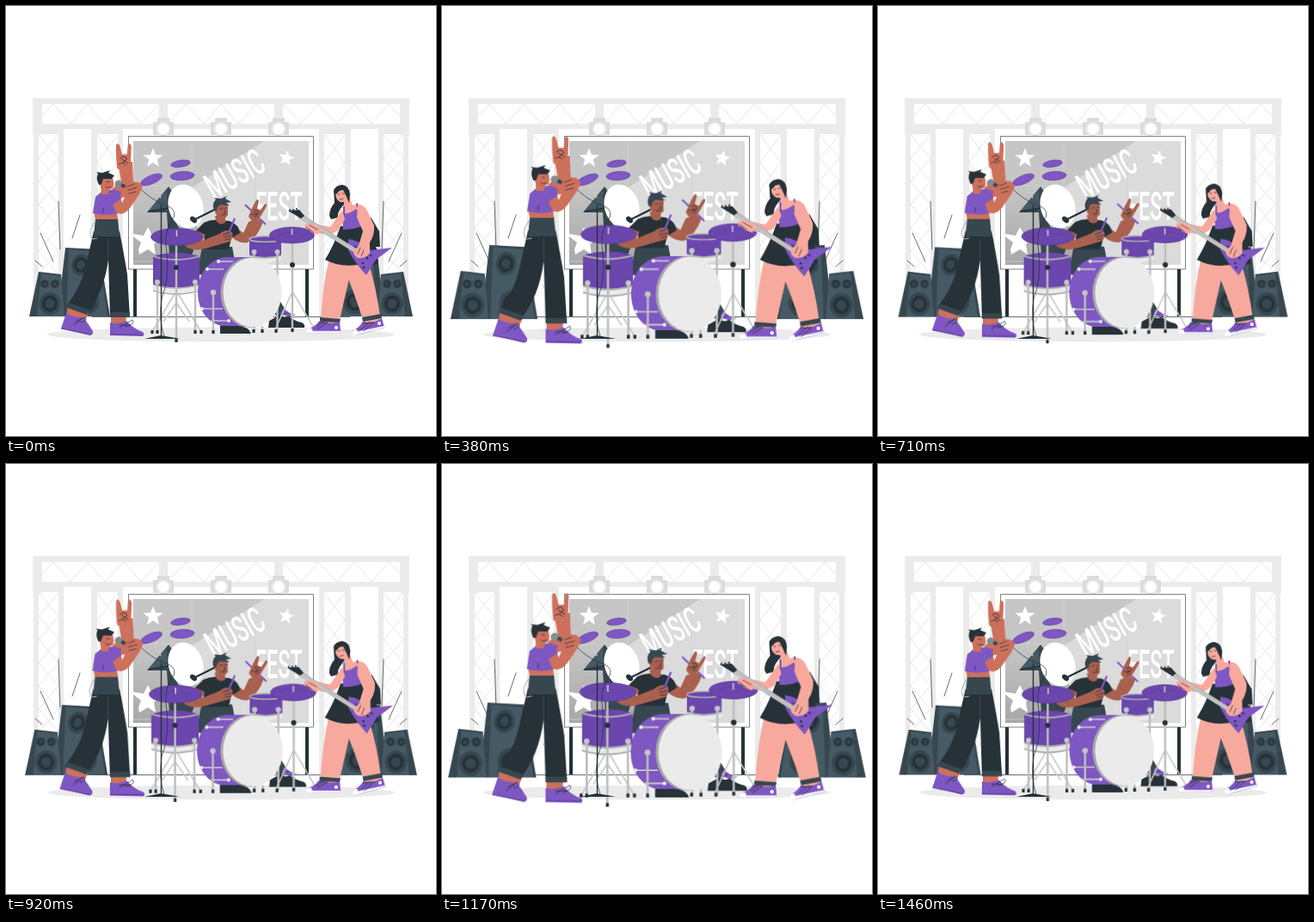
Animation, 500 px wide and 500 px high, one loop 1.5 s. Source, as an HTML page without scripts:

```html
<!DOCTYPE html>
<html lang="en">
<head>
<meta charset="utf-8">
<title>Music fest</title>
<style>
html, body { margin: 0; width: 100%; height: 100%; overflow: hidden; background: #fff; }
svg { display: block; width: 100%; height: 100%; }
.p { fill: #7e57c2; }
.pd { fill: #6a46ad; }
.d { fill: #263238; }
.s { fill: #37474f; }
.m { fill: #455a64; }
.g { fill: #c4c4c4; }
.l { fill: #ebebeb; }
.w { fill: #fff; }
.skin1 { fill: #cd705c; }
.skin2 { fill: #a9604f; }
.skin3 { fill: #f7a99d; }
.line { fill: none; stroke: #263238; stroke-width: .7; stroke-linecap: round; stroke-linejoin: round; }
.truss { fill: none; stroke: #e6e6e6; stroke-width: 1; }
.pole { fill: none; stroke: #bdbdbd; stroke-width: 2.4; }
.thin { fill: none; stroke: #c8c8c8; stroke-width: 1.6; }
.rim { fill: none; stroke: #b0b0b0; stroke-width: 1.8; }
.foot { fill: none; stroke: #263238; stroke-width: 3.2; }
text { font-family: Roboto, "Open Sans", sans-serif; font-weight: 500; fill: #fff; text-anchor: middle; }
/* 24 fps pulse: quick swell, slow release, twice per loop */
.pulse { animation: pulse 1.5s -4ms infinite; }
#speakers { transform-origin: 250px 321px; }
#drums { transform-origin: 263px 306px; }
#singer { transform-origin: 128px 271.5px; }
#guitarist { transform-origin: 388px 295px; }
@keyframes pulse {
  0% { transform: scale(1); animation-timing-function: steps(6); }
  16.6667% { transform: scale(1.1); animation-timing-function: steps(13); }
  52.7778% { transform: scale(1); animation-timing-function: steps(1); }
  55.5556% { transform: scale(1); animation-timing-function: steps(2); }
  61.1111% { transform: scale(1.022); animation-timing-function: steps(4); }
  72.2222% { transform: scale(1.09); animation-timing-function: steps(1); }
  75% { transform: scale(1.1); animation-timing-function: steps(9); }
  100% { transform: scale(1); }
}
</style>
</head>
<body>
<svg viewBox="0 0 500 500" xmlns="http://www.w3.org/2000/svg">
<defs>
  <linearGradient id="shade" x2="0" y2="1">
    <stop offset=".35" stop-color="#c6c6c6"/><stop offset="1" stop-color="#a8a8a8"/>
  </linearGradient>
  <path id="star" d="M0-12 3-4 11.5-3.7 4.8 1.6 7 9.7 0 5-7 9.7-4.8 1.6-11.5-3.7-3-4Z"/>
  <g id="lamp">
    <path fill="#dbdbdb" d="M-7-13H7V-8H12V7H-12V-8H-7Z"/>
    <circle r="8.5" fill="#e8e8e8"/><circle class="w" r="6.5"/>
  </g>
  <g id="tower">
    <path class="truss" d="M38 150 61 177 38 204 61 231 38 258 61 285 38 312 61 339 38 361M61 150 38 177 61 204 38 231 61 258 38 285 61 312 38 339M106 150 130 182 106 214 130 246 106 278 130 310 106 342M130 150 106 182 130 214 106 246 130 278 106 310 130 342"/>
    <path class="truss" d="M42 128 55 114 75 137 95 114 115 137 137 114 157 137 178 114"/>
    <path class="l" d="M31 107H42V150H38V361H32V150H31ZM61 143H67V361H61ZM99 143H106V361H99ZM130 143H136V361H130ZM38 143H61V149H38ZM106 143H130V149H106ZM178 114H188V137H178Z"/>
  </g>
  <g id="sparks" class="line">
    <path d="M61 227 63 283M86 243 77 270M40 264 55 297M34 296 42 303"/>
  </g>
  <g id="cone">
    <circle class="s" r="12.5"/><circle class="d" r="9"/><circle class="s" r="5.5"/>
  </g>
  <g id="stack">
    <path class="s" d="M69 281 108 283 121 361H60Z"/>
    <path class="m" d="M73 283 107 286 118 361H70Z"/>
    <use href="#cone" transform="translate(87 301) rotate(15) scale(.88 1)"/>
    <use href="#cone" transform="translate(94 344) scale(1.15)"/>
    <path class="s" d="M38 309 64 312 69 361H27Z"/>
    <path class="m" d="M41 311 64 314 68 361H36Z"/>
    <use href="#cone" transform="translate(51 346) scale(1 1.05)"/>
    <use href="#cone" transform="translate(45 323) scale(.42)"/>
    <use href="#cone" transform="translate(57 323) scale(.42)"/>
  </g>
  <g id="horns">
    <path d="M-6 10-7-3Q-7-8-7-13-5-17-3-12L-1-4 4-4 5-13Q7-17 8.5-12L8 2 6 11Q0 15-6 10Z"/>
    <path class="line" d="M-3 0Q2-4 4 1L0 4M-1 1 5 5M-4 6Q0 3 3 7"/>
  </g>
</defs>

<rect class="w" width="500" height="500"/>

<!-- Stage truss -->
<path class="truss" d="M188 137 209 114 230 137 250 114 270 137 291 114 312 137"/>
<use href="#tower"/>
<use href="#tower" transform="matrix(-1 0 0 1 500 0)"/>
<path class="l" d="M31 107H469V114H31ZM31 137H469V143H31Z"/>
<use href="#lamp" x="183" y="143"/><use href="#lamp" x="250" y="143"/><use href="#lamp" x="317" y="143"/>
<path class="line" d="M100 361.5H400"/>

<!-- Banner -->
<path class="d" d="M148 305H152V361H148ZM348 305H352V361H348Z"/>
<rect x="142.5" y="151.700" width="214.800" height="154.300" fill="#fff" stroke="#263238" stroke-width=".6"/>
<path fill="#dbdbdb" d="M148 157H352V301H148Z"/>
<path fill="url(#shade)" d="M148 157H300L212 214 225 268 260 301H148Z"/>
<path stroke="#d4d4d4" stroke-width=".7" d="M148 209H212M216 157V212M290 157V301M148 297H352"/>
<use href="#star" class="w" x="171" y="177"/>
<use href="#star" class="w" transform="translate(326 177) rotate(12) scale(.8)"/>
<path class="w" d="M154 283 157 275 148 268V265L160 267 165 257 170 267 181 269 172 277 174 289 165 283 155 289Z"/>
<text transform="translate(273 208) rotate(-29) scale(.56 1)" font-size="42">MUSIC</text>
<text transform="translate(317.500 249) scale(.5 1)" font-size="47">FEST</text>
<path class="s" d="M164 240 189 210 198 222Q190 248 206 264L222 272 216 290H190L187 240Z"/>
<path class="m" d="M187 214 166 238 187 236Z"/>
<ellipse class="w" cx="209" cy="233" rx="20" ry="26" transform="rotate(-18 209 233)"/>

<use href="#sparks"/>
<use href="#sparks" transform="matrix(-1 0 0 1 500 0)"/>
<ellipse class="l" cx="250" cy="382" rx="202" ry="8.500"/>

<g id="speakers" class="pulse">
  <use href="#stack"/>
  <use href="#stack" transform="matrix(-1 0 0 1 500 0)"/>
</g>

<path class="thin" d="M203 183 207 208M168 202 180 223"/>
<g class="p" stroke="#5c3d9c" stroke-width=".5">
  <ellipse cx="169" cy="202" rx="13.500" ry="5" transform="rotate(-23 169 202)"/>
  <ellipse cx="203" cy="183.300" rx="11.500" ry="4" transform="rotate(-8 203 183.300)"/>
  <ellipse cx="205" cy="197.500" rx="14" ry="5.200" transform="rotate(-4 205 197.500)"/>
</g>
<path class="line" style="stroke-width:2.2" d="M218 249 242 237"/>
<ellipse class="d" cx="218" cy="248.500" rx="4.500" ry="3" transform="rotate(40 218 248.500)"/>

<g id="drums" class="pulse">
  <!-- Drummer -->
  <path class="s" d="M228 280H263L270 318 222 312Z"/>
  <path class="s" d="M305 330 318 342 327 357 315 361 300 345Z"/>
  <path class="p" d="M322 352 332 358 329 362 319 357Z"/>
  <path class="d" d="M306 366Q314 362 318 359 322 364 329 361 337 367 344 368 348 370 347 374H305Z"/>
  <path class="line" d="M320 361 327 356M323 363 336 359"/>
  <path class="skin2" d="M266 256 276 264 282 251 292 247 299 251Q293 268 281 275 270 277 261 267Z"/>
  <path stroke="#7e57c2" stroke-width="2" d="M278 231 302 254"/>
  <use href="#horns" class="skin2" transform="translate(291 239) rotate(28) scale(.9)"/>
  <path class="d" d="M230 252Q238 248 246 249L260 250Q271 254 272 264L262 270 259 283H229L231 266 220 262Z"/>
  <path class="skin2" d="M243 244 255 244 255 252Q248 256 244 249Z"/>
  <path class="skin2" d="M242 230Q252 227 258 232L258 243Q254 249 248 247 242 243 242 230Z"/>
  <path class="s" d="M242 238Q239 230 244 225L242 223 250 224 257 221 255 224 262 228 256 229 260 232 249 231 246 234 245 238Z"/>
  <path class="line" d="M249 236 252 235M255 235 257 235M250 243Q253 244 256 242M254 237 255 240 253 241"/>
  <path class="skin2" d="M221 261 232 266 228 273 248 265Q257 258 263 263 265 269 260 274L232 282Q217 286 208 279 211 268 221 261Z"/>
  <path stroke="#7e57c2" stroke-width="2.200" d="M266 247 258 266"/>
  <path class="line" d="M253 266 260 263M254 269 262 267M255 272 261 271"/>

  <!-- Stands behind the drums -->
  <path class="thin" d="M198 331 170 379M198 331 227 379M333 332 313 376M333 332 359 376M198 345 183 367M198 345 213 367"/>

  <!-- Floor tom -->
  <path class="l" d="M171 318H225V331Q198 339 171 331Z"/>
  <path class="pd" d="M171 291Q198 283 225 291V324Q198 332 171 324Z"/>
  <path class="rim" d="M171 291Q198 299 225 291M171 324Q198 332 225 324M171 331Q198 339 225 331"/>
  <!-- Small tom -->
  <path class="l" d="M283 283H320V295Q301 302 283 295Z"/>
  <path class="pd" d="M283 271H320V290Q301 296 283 290Z"/>
  <ellipse class="pd" cx="301.500" cy="271" rx="18.500" ry="3.200" stroke="#b0b0b0" stroke-width="1.500"/>
  <path class="rim" d="M283 290Q301 296 320 290"/>
  <path class="pole" d="M288.500 286V378M315.500 286V378"/>

  <!-- Bass drum -->
  <path class="p" d="M259 292H284V373H259C237 373 223 355 223 333S237 292 259 292Z"/>
  <path class="d" d="M249 372H270Q283 373 285 381H249Z"/>
  <ellipse cx="284" cy="333" rx="34.500" ry="41" fill="#a8a8a8"/>
  <ellipse class="l" cx="286.500" cy="333" rx="34" ry="40.300"/>
  <path class="thin" d="M233 306H253M226 352H252M238 366H260M246 297H264"/>
  <g class="l"><circle cx="234" cy="306" r="2"/><circle cx="228" cy="352" r="2"/><circle cx="259" cy="366" r="2"/><circle cx="247" cy="297" r="2"/></g>

  <path class="pole" d="M241 333V380M176 321V379M220 321V379M198 270V389M333 267V377"/>
  <path class="pole" d="M288 376V380M298 372V380"/>
  <g class="g"><circle cx="241" cy="333" r="3.200"/><circle cx="176" cy="321" r="3"/><circle cx="220" cy="321" r="3"/><circle cx="288.500" cy="286" r="3"/><circle cx="315.500" cy="286" r="3"/></g>
  <g class="d"><circle cx="198" cy="304" r="3"/><circle cx="333" cy="301" r="3"/></g>
  <path class="foot" d="M170 377V381M176 377V381M198 387V391M220 377V381M227 377V381M241 377V381M288 376V380M298 376V380M314 376V380M333 375V379M359 374V377"/>
  <g class="pd" stroke="#543591" stroke-width=".5">
    <ellipse cx="198.500" cy="268.500" rx="30" ry="10"/>
    <ellipse cx="332.500" cy="266.500" rx="26" ry="9.500"/>
  </g>
  <path fill="none" stroke="#5f3ea3" stroke-width=".6" d="M180 268Q198 262 216 268M317 266Q332 260 348 266"/>
  <path class="thin" d="M198.500 261V268M332.500 259V266"/>
</g>

<!-- Microphone stand -->
<path class="line" style="stroke-width:1.400" d="M180.500 232V385M166 239 188 235"/>
<path class="d" d="M161 387Q170 385 180 383 192 385 202 387Z"/>
<path class="line" d="M153 209Q168 226 187 232 202 238 192 251 183 263 187 288 190 318 181 340 177 365 184 384"/>

<g id="singer" class="pulse">
  <!-- Raised arm -->
  <path class="skin1" d="M130 181 147 181 148 204 141 222 126 224 124 212 134 204Z"/>
  <use href="#horns" class="skin1" transform="translate(136 177) scale(1.150)"/>
  <path class="skin1" d="M72 348 96 357 92 366 70 361ZM122 360H140L139 371H122Z"/>
  <path class="p" d="M70 357Q79 363 90 362 96 370 101 378 102 382 98 383L64 375Z"/>
  <path class="p" d="M121 368Q131 371 140 366 149 376 159 379 162 382 159 384L121 383Z"/>
  <path class="line" d="M81 367 91 362Q96 366 87 368M79 371 88 364M132 374 147 365Q151 370 139 373M132 371 144 371"/>
  <path fill="none" stroke="#5c3d9c" d="M64 375 98 382M121 382H159"/>
  <!-- Trousers -->
  <path class="d" d="M102 262H132Q138 293 141 312L144 362H121L119 295Q114 333 94 358L69 350Q88 327 93 301Z"/>
  <path class="s" d="M104 247H130L132 268H102ZM121 356H144V362H121ZM73 345 98 354 94 359 69 350Z"/>
  <path class="line" style="stroke:#455a64" d="M119 270V294"/>
  <path fill="none" stroke="#b5b5b5" d="M104 250Q94 263 100 271L106 270"/>
  <path class="skin1" d="M102 238H129L130 248H104Z"/>
  <path class="p" d="M104 222 111 216 125 213 134 216 130 241Q117 245 101 241Z"/>
  <path class="skin1" d="M110 209 121 212 119 219 111 219Z"/>
  <path class="skin1" d="M110 199 123 198Q127 206 124 212 117 216 111 211 106 206 110 199Z"/>
  <path class="d" d="M108 208Q104 200 107 195L105 193 112 194 121 191 119 194 126 197 123 201 113 201 111 207Z"/>
  <path class="line" d="M117 204 120 205M116 210Q118 213 122 210M113 235V240"/>
  <circle cx="131" cy="207" r="4.500" fill="#8a8a8a"/>
  <path stroke="#37474f" stroke-width="4" d="M134 208 145 213"/>
  <!-- Arm with the microphone -->
  <path class="skin1" d="M120 221 132 219 135 229 139 220 138 210 145 204 154 205 159 210 155 219 144 235Q136 245 128 240Z"/>
  <path class="p" d="M116 220 131 217 134 224 122 232Z"/>
  <path class="line" d="M141 210 149 207M142 214 152 211M143 218 151 216"/>
</g>

<g id="guitarist" class="pulse">
  <path class="d" d="M381 214Q384 208 391 208 399 210 399 219 397 228 391 233 385 240 386 246L378 248 376 244Q376 236 382 229Z"/>
  <path class="skin3" d="M367 362H388L387 371H366ZM415 359 434 356 436 367 416 370Z"/>
  <path class="skin3" d="M376 294H404Q396 331 388 365H366Q369 319 376 294ZM390 298 420 292Q431 329 435 361L415 365Q404 330 390 298Z"/>
  <path class="s" d="M365 362 389 364 388 368 365 367ZM414 362 436 358 437 363 415 367Z"/>
  <path class="p" d="M350 376Q358 374 365 366 377 371 388 367L389 378H350ZM402 378Q410 375 415 367 427 370 437 363L440 374 406 383Z"/>
  <path class="w" stroke="#c9b6e8" stroke-width=".5" d="M349 378H389V380H350ZM402 380 440 372V374L405 383Z"/>
  <path class="w" d="M349 377Q352 374 356 375L357 380H350ZM402 379Q404 376 408 376L410 382 404 383Z"/>
  <circle class="w" cx="384" cy="374" r="2"/><circle class="w" cx="434" cy="369" r="2"/>
  <path class="line" d="M361 373 370 366M363 375 374 368 363 368M413 376 423 367M416 378 427 368 415 369"/>
  <path class="d" d="M389 256 422 255Q431 277 433 299 424 304 408 301 388 304 371 295 381 279 389 256Z"/>
  <path class="d" d="M424 245 434 262 435 280 427 280Z"/>
  <path class="skin3" d="M392 234 410 230 415 252 394 256Z"/>
  <path class="p" d="M391 241Q398 243 407 236L412 240 416 255Q406 260 392 260Z"/>
  <path class="line" d="M393 233V242M408 230 412 242" style="stroke-width:1.600;stroke:#5c3d9c"/>
  <path class="skin3" d="M391 222 399 221 403 232 395 237Z"/>
  <path class="skin3" d="M384 215 394 211Q399 217 397 225 391 231 386 226 382 222 384 215Z"/>
  <path class="d" d="M382 219Q384 209 391 208 399 209 400 219L399 229 396 222 392 214Q387 214 385 218Z"/>
  <path class="line" d="M386 219 388 219M391 218 393 218M388 225 392 224"/>
  <path class="skin3" d="M391 237 394 248 386 261Q376 268 363 264L347 258 350 253 362 254 377 257Z"/>
  <!-- Guitar -->
  <path class="p" d="M398 271Q410 272 424 284L449 281 430 295 419 313Q408 302 398 284Z"/>
  <path stroke="#4f3391" d="M405 279 426 291" stroke-width="2"/>
  <path stroke="#a5a5a5" stroke-width="5.200" d="M339 242 407 285"/>
  <path stroke="#cfcfcf" stroke-width="3.600" d="M342 244 407 285"/>
  <path stroke="#777" stroke-width=".4" d="M341 243 409 286"/>
  <path class="d" d="M328 238 341 237 347 244 343 247Z"/>
  <path class="foot" d="M330 236V238M334 236V238M338 235V237" style="stroke-width:1.500"/>
  <g class="d"><circle cx="415" cy="299" r="1.300"/><circle cx="416" cy="304" r="1.300"/><circle cx="420" cy="293" r="1.300"/></g>
  <path class="skin3" d="M347 254 354 252 365 257 363 266 355 263Z"/>
  <path class="line" d="M349 257 357 263M353 255 362 260"/>
  <path class="skin3" d="M409 231Q416 230 420 238L428 255Q429 266 423 275L423 288Q417 294 410 293 404 291 404 285L410 279 415 262 408 246Z"/>
  <path class="line" d="M409 288 412 281M413 291 416 284"/>
</g>
</svg>
</body>
</html>
```
